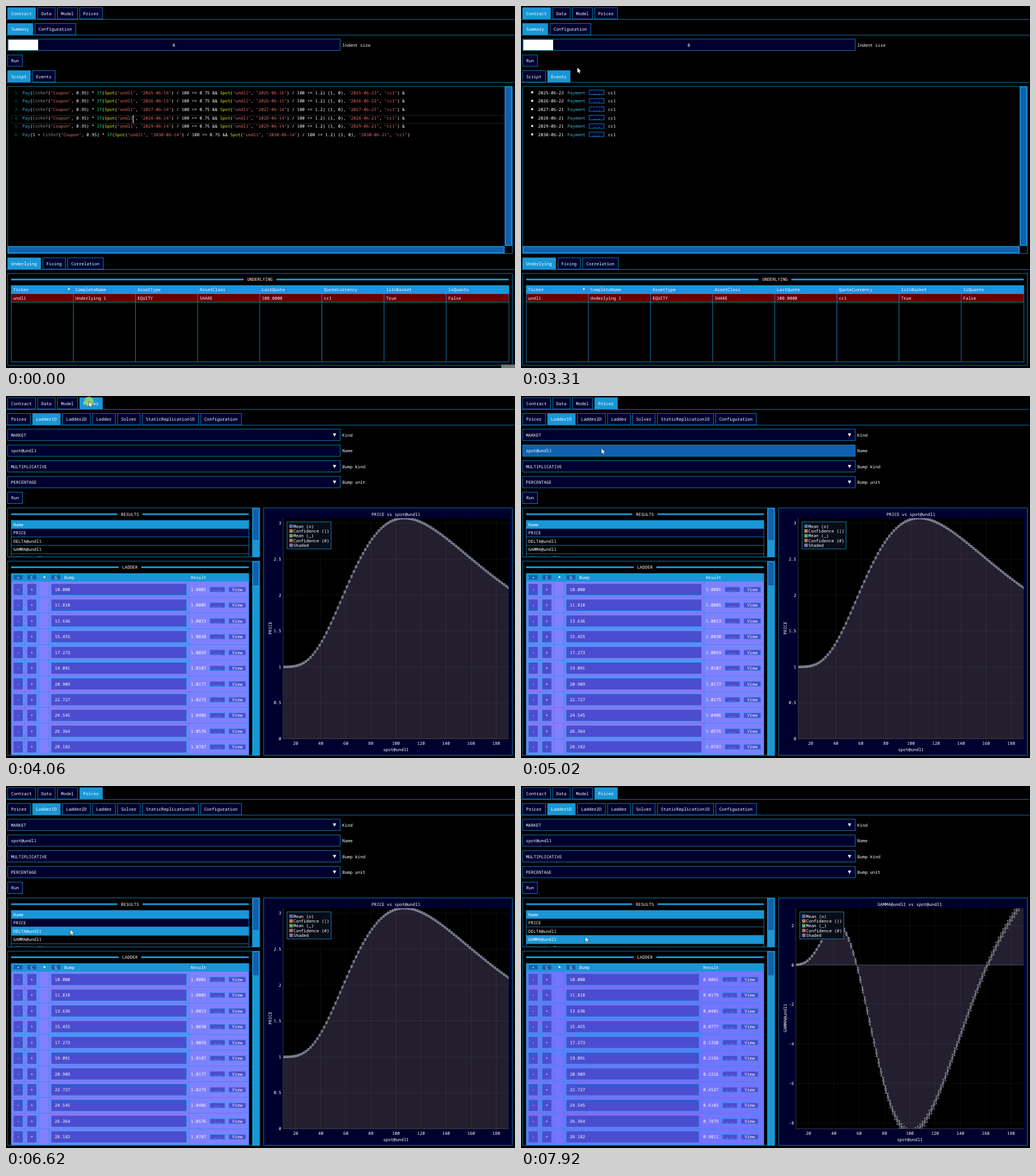
An HTML page for the animation above (8000 ms loop, 887 px wide and 631 px high).

```html
<!DOCTYPE html>
<html lang="en">
<head>
<meta charset="utf-8">
<title>Contract pricer</title>
<style>
html, body { margin: 0; width: 100%; height: 100%; overflow: hidden; background: #000; }
svg { display: block; width: 887px; height: 631px; }
text { font: 7.467px "Noto Sans Mono", "DejaVu Sans Mono", monospace; white-space: pre; text-rendering: geometricPrecision; }
</style>
</head>
<body>
<svg viewBox="0 0 887 631" width="887" height="631">
  <defs>
    <clipPath id="results"><rect x="3" y="195" width="426" height="85"/></clipPath>
    <clipPath id="ladder"><rect x="3" y="288" width="426" height="338"/></clipPath>
  </defs>
  <rect width="887" height="631"/>
  <g id="ui"></g>
  <circle id="click" r="8.3" fill="#a0d468" opacity=".85"/>
  <path id="arrow" d="M0 0V9.7L2.2 7.7 3.7 11 5.3 10.3 3.9 7.1H7Z" fill="#fff" stroke="#000" stroke-width=".5"/>
  <path id="beam" d="M-2.5-5.5H-.6L0-5 .6-5.5H2.5M0-5V5M-2.5 5.5H-.6L0 5 .6 5.5H2.5" fill="none" stroke="#ddd"/>
</svg>
<script>
const LOOP = 8000, CHAR = 4.48, LEFT = 2.56, RIGHT = 882.6, HIGH = 20.5;
const BLUE = '#1996d6', NAVY = '#00002e', GRAB = '#1060b0', CYAN = '#3fb8e8', CELL = '#4c4cd0';
const rowY = k => 2.56 + k * 27.45;
const byId = id => document.getElementById(id);
const esc = s => String(s).replace(/&/g, '&amp;').replace(/</g, '&lt;');
let mouse = { x: -99, y: -99 };

// ---- drawing helpers ----
const fill = (x, y, x2, y2, color) =>
  `<rect x="${x}" y="${y}" width="${x2 - x}" height="${y2 - y}" fill="${color}"/>`;
const box = (x, y, x2, y2, color = 'none', edge = BLUE) =>
  `<rect x="${x + .32}" y="${y + .32}" width="${x2 - x - .64}" height="${y2 - y - .64}" ` +
  `fill="${color}" stroke="${edge}" stroke-width=".8"/>`;
const label = (s, x, y, color = '#fff', anchor = 'start', more = '') =>
  `<text x="${x}" y="${y + 2.6}" fill="${color}" text-anchor="${anchor}" ${more}>${esc(s)}</text>`;
const mid = (s, x, y) => label(s, x, y, '#fff', 'middle');
const path = (d, color, width = .8) => `<path d="${d}" fill="none" stroke="${color}" stroke-width="${width}"/>`;
const hline = (x, x2, y) => path(`M${x} ${y}H${x2}`, BLUE);
const over = (x, y, x2, y2) => mouse.x >= x && mouse.x < x2 && mouse.y >= y && mouse.y < y2;
const sortMark = (x, y) => `<path d="M${x - 2} ${y + 2}h4l-2-4z" fill="#fff"/>`;
const hot = (x, y, x2, y2, color = NAVY) => box(x, y, x2, y2, over(x, y, x2, y2) ? GRAB : color);

function button(s, x, y, x2, y2, color) {
  return hot(x, y, x2, y2, color) + mid(s, (x + x2) / 2, (y + y2) / 2);
}
function tabs(y, names, active) {
  let x = LEFT, out = '';
  names.forEach((s, i) => {
    const w = s.length * CHAR + 13.3, area = [x, y, x + w, y + HIGH];
    out += (i === active ? box(...area, BLUE) : hot(...area)) + label(s, x + 6.4, y + 10.6);
    x += w + 3.2;
  });
  return out + hline(0, 886, y + HIGH + .3);
}
function caption(s, x, x2, y) {
  const c = (x + x2) / 2, half = s.length * CHAR / 2 + 6.3;
  return fill(x, y - 1.5, c - half, y + 1.5, BLUE) + fill(c + half, y - 1.5, x2, y + 1.5, BLUE) + mid(s, c, y);
}
const scrollbar = (x, y, x2, y2, gx2, gy2) =>
  fill(x, y, x2, y2, BLUE) + fill(x + 1.5, y + 1.5, gx2, gy2, GRAB);

// ---- contract page ----
const fixDays = [16, 15, 14, 14, 14, 14];
const date = (i, wait) => `${2025 + i}-06-${fixDays[i] + wait}`;
const lineY = i => 151 + i * 14.65;
const words = { Pay: CYAN, CstRef: '#858585', If: '#00e676', Spot: '#d4f000' };

function script(i) {
  const last = i === 5, spot = `Spot("undl1", "${date(i, 0)}") / 100`;
  return `Pay(${last ? '1 + ' : ''}CstRef("Coupon", 0.95) * If(${spot} >= 0.75 && ${spot} <= 1.2) (1, 0), ` +
    `"${date(i, 7)}", "cc1")${last ? '' : ' &'}`;
}
function codeLine(i) {
  const parts = script(i).split(/("[^"]*"|Pay|CstRef|If|Spot)/).map(p =>
    `<tspan fill="${p[0] === '"' ? '#e06c68' : words[p] || '#fff'}">${esc(p)}</tspan>`);
  return label(i + 1, 15, lineY(i), '#00705c') +
    `<text x="28.5" y="${lineY(i) + 2.6}">${parts.join('')}</text>`;
}
function eventLine(i) {
  const y = lineY(i);
  return `<circle cx="19.5" cy="${y - .5}" r="1.9" fill="#fff"/>` +
    label(date(i, 7), 29.8, y) + label('Payment', 81, y, CYAN) +
    box(118.6, y - 4.7, 145, y + 3.9, NAVY) + mid('...', 132, y) + label('cc1', 151.8, y);
}
function underlying() {
  const head = ['Ticker', 'CompleteName', 'AssetType', 'AssetClass', 'LastQuote', 'QuoteCurrency', 'IsInBasket', 'IsQuanto'];
  const row = ['undl1', 'Underlying 1', 'EQUITY', 'SHARE', '100.0000', 'cc1', 'True', 'False'];
  let out = box(LEFT, 465.8, RIGHT, 626.6) + caption('UNDERLYING', 9, 876, 476.7) +
    fill(9, 487, 876, 502, BLUE) + fill(9, 502, 876, 516, '#640000') + hline(9, 876, 516.3);
  head.forEach((s, i) => {
    const x = 9 + i * 108.3;
    if (i) out += path(`M${x} 487V620`, '#1d9fe2');
    out += label(s, x + 3.6, 494.5) + label(row[i], x + 3.6, 509);
  });
  return out + sortMark(109.5, 492.5) + box(8.8, 486.8, 876.6, 620.8);
}
function contractPage(events, caret) {
  let out = tabs(rowY(0), ['Contract', 'Data', 'Model', 'Pricer'], 0) +
    tabs(rowY(1), ['Summary', 'Configuration'], 0) +
    hot(LEFT, rowY(2), 582.6, rowY(2) + HIGH) + fill(4, 58.8, 56, 77, '#fff') +
    mid('0', 292.5, 68.5) + label('Indent size', 586, 68.5) +
    button('Run', LEFT, rowY(3), 29, rowY(3) + HIGH) +
    tabs(rowY(4), ['Script', 'Events'], events ? 1 : 0) + box(LEFT, rowY(5), RIGHT, 431.6) +
    scrollbar(869, 140, 882, 418, 880.5, 416.5) + scrollbar(3, 418.5, 869, 431, 867.5, 429.5);
  if (!events) out += box(9.3, 190.3, 867.5, 204.8, 'none', '#2a2a2a');
  for (let i = 0; i < 6; i++) out += events ? eventLine(i) : codeLine(i);
  if (caret && !events) out += fill(221, 190.5, 222, 204.5, '#fff');
  return out + tabs(438.6, ['Underlying', 'Fixing', 'Correlation'], 0) + underlying();
}

// ---- pricing: six coupons paid while the spot ends between 75 and 120 ----
const pdf = d => Math.exp(-d * d / 2) / Math.sqrt(2 * Math.PI);
const cdf = d => 1 / (1 + Math.exp(-1.5976 * d - .07056 * d ** 3));
function coupons(x, term) {
  let total = 0;
  for (let i = 0; i < 6; i++) {
    const dev = .2 * Math.sqrt(4 + i), d = k => (Math.log(x / k) - dev * dev / 2) / dev;
    total += .95 * (term(d(75), dev) - term(d(120), dev));
  }
  return total;
}
const price = x => 1 + coupons(x, cdf);
const delta = x => coupons(x, (d, dev) => pdf(d) / dev);
const gamma = x => coupons(x / 1.03, (d, dev) => -pdf(d) * (d / dev + 1) / dev);
const spots = Array.from({ length: 100 }, (_, i) => 10 + i * 20 / 11);
const rise = (x, from, span) => 1 / (1 + Math.exp(-(x - from) / span));

const measures = [
  { name: 'PRICE', value: price, left: 483, zero: 597.5, unit: 125.3, step: .5, from: 0, to: 3, col: 319,
    row: '#8080ff', err: () => 1.4 },
  { name: 'DELTA@undl1', value: delta, left: 488, zero: 407.5, unit: 78.7, step: .5, from: -2, to: 2, col: 315.5,
    row: '#7474ff', err: x => 1 + 3.8 * rise(x, 60, 14) },
  { name: 'GAMMA@undl1', value: gamma, left: 479, zero: 312, unit: 34.4, step: 2, from: -8, to: 2, col: 314.5,
    row: '#7474ff', err: x => 1 + 6 * rise(x, 55, 9) }
];
const legend = [['Mean (o)', '#4c72b0'], ['Confidence (|)', '#b9805c'], ['Mean (_)', '#6aa368'],
  ['Confidence (#)', '#b0735e'], ['Shaded', '#8172b3']];

function plot(m) {
  const right = 876, top = 213, bottom = 597.5, center = (m.left + right) / 2;
  const px = x => m.left + (x - 10) * (right - m.left) / 180, py = y => m.zero - y * m.unit;
  const pts = spots.map(x => [px(x), py(m.value(x))]);
  const line = pts.map(p => p.map(v => v.toFixed(1)).join(' ')).join('L');
  let grid = '', ticks = '', bars = '', dots = '';
  for (let x = 20; x <= 180; x += 20) {
    grid += `M${px(x)} ${top}V${bottom}`;
    ticks += mid(x, px(x), 605);
  }
  for (let y = m.from; y <= m.to; y += m.step) {
    grid += `M${m.left} ${py(y)}H${right}`;
    ticks += label(y, m.left - 3.2, py(y), '#fff', 'end');
  }
  pts.forEach(([x, y], i) => {
    const e = m.err(spots[i]);
    bars += `M${x} ${y - e}V${y + e}M${x - 1.7} ${y - e}h3.4M${x - 1.7} ${y + e}h3.4`;
    dots += `M${x - 2.1} ${y}a2.1 2.1 0 1 0 4.2 0a2.1 2.1 0 1 0-4.2 0`;
  });
  const lx = m.left + 6.5;
  let key = box(lx, 219, lx + 77.3, 267, '#090d18');
  legend.forEach(([s, c], i) => {
    const y = 227 + i * 8.3;
    key += fill(lx + 4.3, y - 3, lx + 10.3, y + 3, c) + label(s, lx + 11.2, y);
  });
  return box(448.6, rowY(7), RIGHT, 626.6, NAVY) + fill(m.left, top, right, bottom, '#000') +
    `<clipPath id="area"><rect x="${m.left}" y="${top}" width="${right - m.left}" height="${bottom - top}"/></clipPath>` +
    `<g clip-path="url(#area)"><path d="M${m.left} ${m.zero}L${line}V${m.zero}Z" fill="#231f2e"/>` +
    path(grid, 'rgba(255,255,255,.08)') + path(`M${m.left} ${m.zero}H${right}`, '#55525c') +
    path('M' + line, '#b8b8c4', .6) + path(bars, '#d6d0d0', .6) + path(dots, '#93a8cc', .6) + '</g>' +
    path(`M${m.left} ${top}V${bottom}H${right}`, '#45454f') + ticks + key +
    mid(`${m.name} vs spot@undl1`, center, 206) + mid('spot@undl1', center, 616.5) +
    label(m.name, 0, 0, '#fff', 'middle', 'transform="translate(460 404.5) rotate(-90)"');
}

// ---- pricer page ----
function field(k, s, name, combo) {
  const y = rowY(k), c = y + 10.8;
  const mark = combo ? `<path d="M569.5 ${c - 3}h6l-3 5.5z" fill="#fff"/>` : '';
  return hot(LEFT, y, 582.6, y + HIGH) + label(s, 8.5, c) + mark + label(name, 586, c);
}
function results(m) {
  let rows = '';
  ['PRICE', 'DELTA@undl1', 'GAMMA@undl1', 'VEGA01@undl1'].forEach((s, i) => {
    const y = 231 + i * 14.65, area = [9, y, 423, y + 14.65];
    if (over(...area)) rows += fill(...area, BLUE);
    else if (s === m.name) rows += fill(...area, NAVY);
    rows += hline(9, 423, y) + label(s, 12.7, y + 7.5);
  });
  rows += fill(9, 216.5, 423, 231, BLUE) + label('Name', 12.7, 224);
  return caption('RESULTS', 9, 423, 206) +
    `<g clip-path="url(#results)">${rows}${path('M9.2 216V281M423.2 216V281', BLUE)}</g>` +
    box(LEFT, rowY(7), 442.4, 281) + scrollbar(429, 195, 442, 281, 440.5, 251);
}
function ladder(m) {
  const c = m.col;
  const small = (s, x, w, y, color) => button(s, x, y - 4.5, x + w, y + 4.5, color);
  let rows = fill(9, 323, 423, 627, m.row);
  spots.slice(0, 11).forEach((x, i) => {
    const y = 337.2 + i * 27.45, a = y - HIGH / 2, b = y + HIGH / 2;
    rows += button('-', 12.8, a, 29.6, b, CELL) + button('+', 36.6, a, 53.4, b, CELL) +
      box(78.6, a, c - 4, b, CELL) + label(x.toFixed(3), 85, y) + label(m.value(x).toFixed(4), c + 3, y) +
      small('...', c + 36.5, 26, y, CELL) + small('View', c + 69, 30, y, CELL) + hline(9, 423, y + 13.6);
  });
  const lines = [33, 57, 75, c].map(x => `M${x} 309V627`).join('');
  return caption('LADDER', 9, 423, 298.5) + `<g clip-path="url(#ladder)">${rows}` + fill(9, 309, 423, 323.5, BLUE) +
    path(lines, '#2a8fe6') + small('+', 12.8, 16.8, 316, GRAB) + small('C', 36.6, 16.8, 316, GRAB) +
    small('G', 78.6, 16.8, 316, GRAB) + sortMark(67, 315) + label('Bump', 101.5, 316.3) +
    label('Result', c + 3, 316.3) + path('M9.2 309V627M423.2 309V627', BLUE) + '</g>' +
    box(LEFT, 287.6, 442.4, 626.6) + scrollbar(429, 288, 442, 627, 440.5, 330);
}
function pricerPage(m) {
  return tabs(rowY(0), ['Contract', 'Data', 'Model', 'Pricer'], 3) +
    tabs(rowY(1), ['Pricer', 'Ladder1D', 'Ladder2D', 'Ladder', 'Solver', 'StaticReplication1D', 'Configuration'], 1) +
    field(2, 'MARKET', 'Kind', true) + field(3, 'spot@undl1', 'Name', false) +
    field(4, 'MULTIPLICATIVE', 'Bump kind', true) + field(5, 'PERCENTAGE', 'Bump unit', true) +
    button('Run', LEFT, rowY(6), 29, rowY(6) + HIGH) + results(m) + ladder(m) + plot(m);
}

// ---- timeline: [start, end, x, y]; the pointer advances every STEP ms ----
const STEP = 70;
const moves = [[660, 1190, 229, 272], [1460, 2080, 77, 141], [2150, 2220, 66, 123], [2960, 3310, 98, 107],
  [3380, 3860, 144.5, 9.5], [4330, 4400, 147, 14.5], [4600, 5500, 133, 168], [5720, 5930, 133, 177],
  [6130, 6620, 112, 250], [7580, 7650, 112, 262.5]];
const clicks = [2350, 3930, 6760, 7700], HOLD = 200, SWITCH = 85;

function pointer(t) {
  if (t < moves[0][0]) return { x: -99, y: -99 };
  let x = 848, y = 628;
  for (const [start, end, tx, ty] of moves) {
    if (t < start) break;
    const steps = Math.round((end - start) / STEP) + 1;
    const u = Math.min(1, (Math.floor((t - start) / STEP + .2) + 1) / steps);
    x += (tx - x) * u;
    y += (ty - y) * u;
  }
  return { x, y };
}

let shown = '';
function draw(t) {
  mouse = pointer(t);
  const page = clicks.filter(c => t >= c + SWITCH).length;
  const caret = Math.floor(t / 400) % 2 === 0, notice = t < 70;
  const key = [page, caret && !page, notice, mouse.x, mouse.y].join();
  if (key !== shown) {
    shown = key;
    byId('ui').innerHTML = (page < 2 ? contractPage(page === 1, caret) : pricerPage(measures[page - 2])) +
      (notice ? fill(863, 625, 887, 631, '#777') : '');
  }
  const typing = page === 0 && over(3, 140, 869, 418), down = clicks.some(c => t >= c && t < c + HOLD);
  const place = (id, on) =>
    byId(id).setAttribute('transform', on ? `translate(${mouse.x} ${mouse.y})` : 'translate(-99 -99)');
  place('arrow', !typing);
  place('beam', typing);
  place('click', down);
}

const begin = performance.now();
function tick() {
  draw((performance.now() - begin) % LOOP);
  requestAnimationFrame(tick);
}
tick();
</script>
</body>
</html>
```
